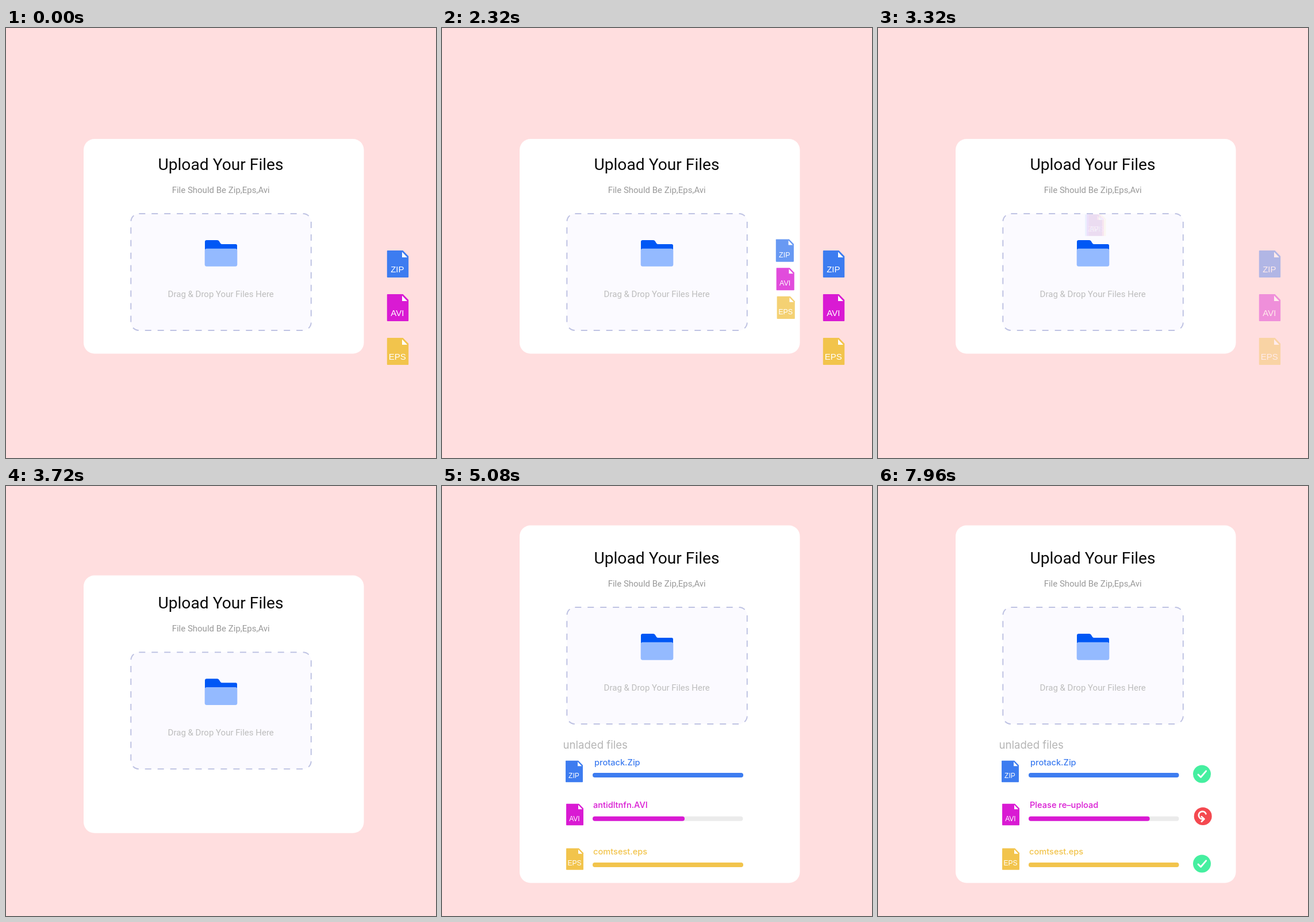
Recreate the animation shown at these times as an HTML page. Size 748 px wide and 748 px high, loop 8000 ms.

```html
<!DOCTYPE html>
<html lang="en">
<head>
<meta charset="utf-8">
<title>File upload</title>
<style>
html, body { margin: 0; width: 100%; height: 100%; overflow: hidden; background: #ffdedf; }
svg { display: block; width: 100vw; height: 100vh; }
.ui { font-family: Roboto, sans-serif; text-anchor: middle; }
.tag { font: 15px "Liberation Sans", Arial, sans-serif; fill: #fff; text-anchor: middle; }
.list { font: 500 14.6px Inter, sans-serif; }
.line { fill: none; stroke: #fff; stroke-width: 2.8; stroke-linecap: round; stroke-linejoin: round; }
</style>
</head>
<body>
<svg viewBox="0 0 748 748">
  <defs>
    <clipPath id="clip"><rect class="card" x="135" width="487.5" rx="19"/></clipPath>
    <path id="page" d="M-17.7-23.5H9L18.7-13.5V22.5Q18.7 23.5 17.7 23.5H-17.7Q-18.7 23.5-18.7 22.5V-22.5Q-18.7-23.5-17.7-23.5Z"/>
    <path id="fold" d="M7.5-21V-11.5H16.5Z" fill="#fff"/>
    <g id="tick">
      <circle r="15.5" fill="#45efa0"/>
      <path class="line" d="M-6.5 1L-2 5.5L7.2-5.2"/>
    </g>
  </defs>
  <rect width="748" height="748" fill="#ffdedf"/>
  <rect class="card" x="135" width="487.5" rx="19" fill="#fff"/>
  <g id="drop" class="ui">
    <text x="373.5" y="247" font-size="28.2" fill="#0a0a0a">Upload Your Files</text>
    <text x="373.7" y="287" font-size="15" fill="#999">File Should Be Zip,Eps,Avi</text>
    <rect x="217.3" y="323" width="313.5" height="203" rx="14" fill="#fbfaff"
      stroke="#bfc3e3" stroke-width="2" stroke-dasharray="11 10.95"/>
    <path d="M346 388V372Q346 369 349 369H367.5Q369.5 369 370.5 370.6L373 374.4Q374 376 376 376H399.5Q402 376 402 378.500V388Z" fill="#0057f5"/>
    <rect x="345.700" y="383.700" width="56.600" height="31" rx="3.500" fill="#94baff"/>
    <text x="373.7" y="468" font-size="15" fill="#bdbdbd">Drag &amp; Drop Your Files Here</text>
  </g>
  <g id="side"></g>
  <g id="drag"></g>
  <g clip-path="url(#clip)">
    <g id="list" class="list">
      <text x="210.500" y="456.500" font-size="18.600" font-weight="400" fill="#b5b5b5">unladed files</text>
      <g id="rows"></g>
      <text id="retry" x="264" y="560" fill="#d91ad3">Please re–upload</text>
      <use class="tick" href="#tick"/>
      <use class="tick" href="#tick"/>
      <g id="reload">
        <circle r="15.5" fill="#f44950"/>
        <g id="spin">
          <path class="line" stroke-linecap="butt" d="M0-5.500A6.500 6.500 0 1 1-6 3.500"/>
          <path class="line" d="M1.500-10L-3-5.500L1.500-1.500"/>
        </g>
      </g>
    </g>
  </g>
</svg>
<script>
const LOOP = 8000;
const files = [
  { tag: 'ZIP', name: 'protack.Zip', color: '#3d7cf0', y: 410.5, press: 200, endX: 375, row: [230, 496.5, 265, 486, 503], from: 371, mid: 523.5, to: 523.5 },
  { tag: 'AVI', name: 'antidltnfn.AVI', color: '#d91ad3', y: 486.5, press: 800, endX: 378, row: [231, 571.5, 263, 560, 578.8], from: 328, mid: 421.7, to: 472.7 },
  { tag: 'EPS', name: 'comtsest.eps', color: '#f2c44c', y: 562.5, press: 1400, endX: 381.6, row: [231, 649, 263, 640.5, 659], from: 380, mid: 523.5, to: 523.5 }
];
const $ = id => document.getElementById(id);
const clamp = v => Math.max(0, Math.min(1, v));
const part = (t, start, dur) => clamp((t - start) / dur);
const mix = (a, b, p) => a + (b - a) * p;
const place = (el, x, y, s) => el.setAttribute('transform', `translate(${x} ${y}) scale(${s})`);

// Damped spring from 0 to 1, time in ms
function spring(ms, stiffness, damping) {
  if (ms <= 0) return 0;
  const t = ms / 1000, d = damping / 2, w = Math.sqrt(stiffness - d * d);
  return 1 - Math.exp(-d * t) * (Math.cos(w * t) + d / w * Math.sin(w * t));
}

function add(parent, html) {
  parent.insertAdjacentHTML('beforeend', html);
  return parent.lastElementChild;
}

function icon(parent, f) {
  return add(parent, `<g><use href="#page" fill="${f.color}"/><use href="#fold"/><text class="tag" x="-.7" y="14">${f.tag}</text></g>`);
}

function bar(parent, y, color, width) {
  return add(parent, `<rect x="262" y="${y - 4}" width="${width}" height="8" rx="4" fill="${color}"/>`);
}

for (const f of files) {
  const [ix, iy, tx, ty, by] = f.row, rows = $('rows');
  f.side = icon($('side'), f);
  place(icon(rows, f), ix, iy, 0.8);
  f.label = add(rows, `<text x="${tx}" y="${ty}" fill="${f.color}">${f.name}</text>`);
  bar(rows, by, '#ebebeb', 261.5);
  f.bar = bar(rows, by, f.color, 0);
}
for (const i of [2, 0, 1]) files[i].copy = icon($('drag'), files[i]);

const cards = document.querySelectorAll('.card');
const ticks = document.querySelectorAll('.tick');

function draw(t) {
  const grow = 1 - Math.pow(1 - part(t, 3600, 840), 2.3);
  const gone = 1 - part(t, 3200, 200);
  for (const c of cards) {
    c.setAttribute('y', 193 - 124.5 * grow);
    c.setAttribute('height', 373.5 + 248.5 * grow);
  }
  place($('drop'), 0, -112 * grow, 1);

  const move = part(t, 1980, 860);
  const mx = Math.pow(move, 1.385), my = Math.pow(move, 1.145);
  const fill = spring(t - 4440, 600, 15);
  const done = spring(t - 5280, 300, 20);
  for (const f of files) {
    place(f.side, 681.5, f.y, 1 - 0.085 * Math.sin(Math.PI * part(t, f.press, 400)));
    place(f.copy, mix(681.5, f.endX, mx), mix(f.y, 343, my), 1 - 0.2 * Math.min(1, 3 * mx));
    f.copy.setAttribute('opacity', 1 - 0.8 * mx);
    const end = mix(f.from, f.mid, fill) + (f.to - f.mid) * done;
    f.bar.setAttribute('width', end - 262);
  }
  $('side').setAttribute('opacity', gone);
  $('drag').setAttribute('opacity', move > 0 ? gone : 0);

  place($('list'), 0, 112 * (1 - grow), 1);
  $('list').setAttribute('opacity', clamp((grow - 0.35) / 0.65));

  const shown = clamp(done);
  files[1].label.setAttribute('opacity', 1 - shown);
  $('retry').setAttribute('opacity', shown);
  place(ticks[0], 563.5, 501, done);
  place(ticks[1], 563.5, 657, done);
  place($('reload'), 565.2, 574.5, 1);
  $('reload').setAttribute('opacity', shown);
  const angle = -180 * Math.max(0, t - 6120) / 1560 + 32.3;
  $('spin').setAttribute('transform', `rotate(${angle}) translate(.8 .8)`);
}

function tick() {
  draw(performance.now() % LOOP);
  requestAnimationFrame(tick);
}
tick();
</script>
</body>
</html>
```
